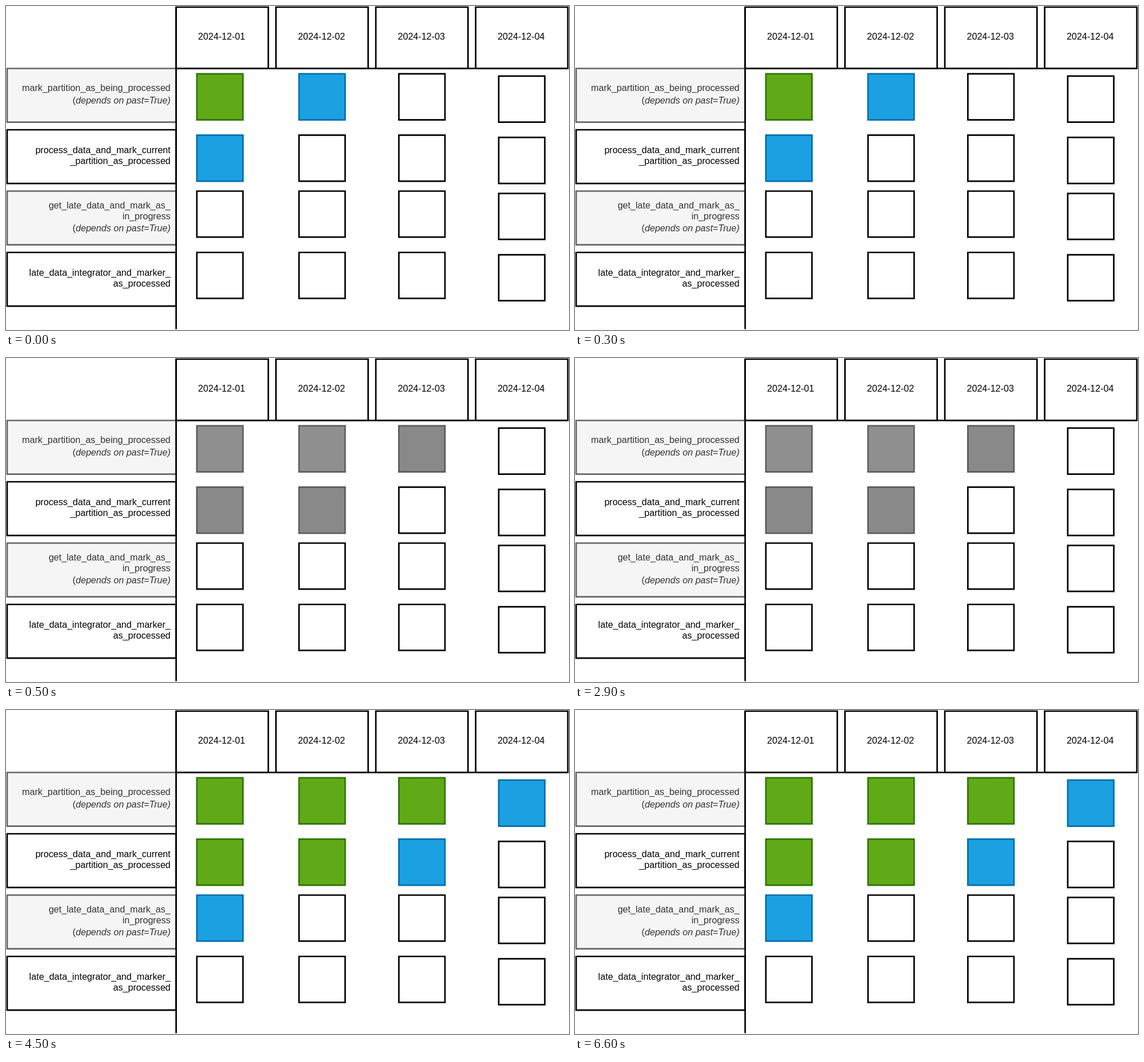
Animation of 985 by 568 pixels, one loop 8000 ms. Source, as an HTML page with a canvas:

```html
<!DOCTYPE html>
<html lang="en">
<head>
<meta charset="utf-8">
<title>Task grid by day</title>
<style>
  html, body { margin: 0; width: 100%; height: 100%; overflow: hidden; background: #fff; }
  canvas { display: block; }
</style>
</head>
<body>
<canvas id="stage" width="985" height="568"></canvas>
<script>
const ctx = document.getElementById('stage').getContext('2d');
const UNIT = 985 / 733;
const MARGIN = 1.5;
const LOOP = 8000;
const FONT = `${12 * UNIT}px "Liberation Sans", Arial, sans-serif`;

// Cell styles: [fill, stroke]
const STYLES = {
  '.': ['#ffffff', '#000000'],
  G: ['#60a917', '#2d7600'],
  B: ['#1ba1e2', '#006eaf'],
  g: ['#8f8f8f', '#5e5e5e'],
  b: ['#898989', '#5b5b5b']
};
const MUTED = ['#f5f5f5', '#666666'];

// Each stage lists the cells row by row.
const STAGES = [
  { from: 0, rows: ['GB..', 'B...', '....', '....'] },
  { from: 500, rows: ['ggb.', 'bb..', '....', '....'] },
  { from: 4500, rows: ['GGGB', 'GGB.', 'B...', '....'] }
];

const DATES = ['2024-12-01', '2024-12-02', '2024-12-03', '2024-12-04'];
const NOTE = 'depends on past=True)';
const TASKS = [
  { muted: true, lines: [['mark_partition_as_being_processed', 149]], note: 170.5 },
  { lines: [['process_data_and_mark_current', 258], ['_partition_as_processed', 277]] },
  { muted: true, lines: [['get_late_data_and_mark_as_', 354.5], ['in_progress', 374]], note: 395 },
  { lines: [['late_data_integrator_and_marker_', 473], ['as_processed', 492]] }
];
const CELL_X = [247, 380, 510, 640];
const CELL_Y = [87, 167, 240, 320];
const LAST_DROP = 3;

// Boxes and lines use diagram units, text uses pixels.
const px = u => (u + MARGIN) * UNIT;

function box(x, y, w, h, [fill, stroke]) {
  ctx.fillStyle = fill;
  ctx.strokeStyle = stroke;
  ctx.beginPath();
  ctx.rect(px(x), px(y), w * UNIT, h * UNIT);
  ctx.fill();
  ctx.stroke();
}

function line(x1, y1, x2, y2) {
  ctx.strokeStyle = '#000';
  ctx.beginPath();
  ctx.moveTo(px(x1), px(y1));
  ctx.lineTo(px(x2), px(y2));
  ctx.stroke();
}

function text(str, x, y, align, color, style = '') {
  ctx.font = `${style} ${FONT}`;
  ctx.textAlign = align;
  ctx.fillStyle = color;
  ctx.fillText(str, x, y);
}

function drawTask(task, row) {
  const color = task.muted ? '#333333' : '#000000';
  const right = 287.8;
  box(0, 80 * (row + 1), 220, 70, task.muted ? MUTED : STYLES['.']);
  for (const [str, y] of task.lines) text(str, right, y, 'right', color);
  if (task.note) {
    text(NOTE, right, task.note, 'right', color, 'italic');
    text('(', right - ctx.measureText(NOTE).width, task.note, 'right', color);
  }
}

function draw(time) {
  const { rows } = STAGES.findLast(s => time >= s.from);
  ctx.fillStyle = '#fff';
  ctx.fillRect(0, 0, 985, 568);
  ctx.lineWidth = 2 * UNIT;

  TASKS.forEach(drawTask);
  DATES.forEach((date, i) => {
    const x = 220 + 130 * i;
    box(x, 0, 120, 80, STYLES['.']);
    text(date, px(x + 60) - 1, 59.3, 'center', '#000');
  });
  line(220, 0, 220, 420);
  line(220, 80, 730, 80);

  rows.forEach((row, r) => [...row].forEach((state, c) => {
    const y = CELL_Y[r] + (c === 3 ? LAST_DROP : 0);
    box(CELL_X[c], y, 60, 60, STYLES[state]);
  }));
}

const start = performance.now();
function tick() {
  draw((performance.now() - start) % LOOP);
  requestAnimationFrame(tick);
}
tick();
</script>
</body>
</html>
```
